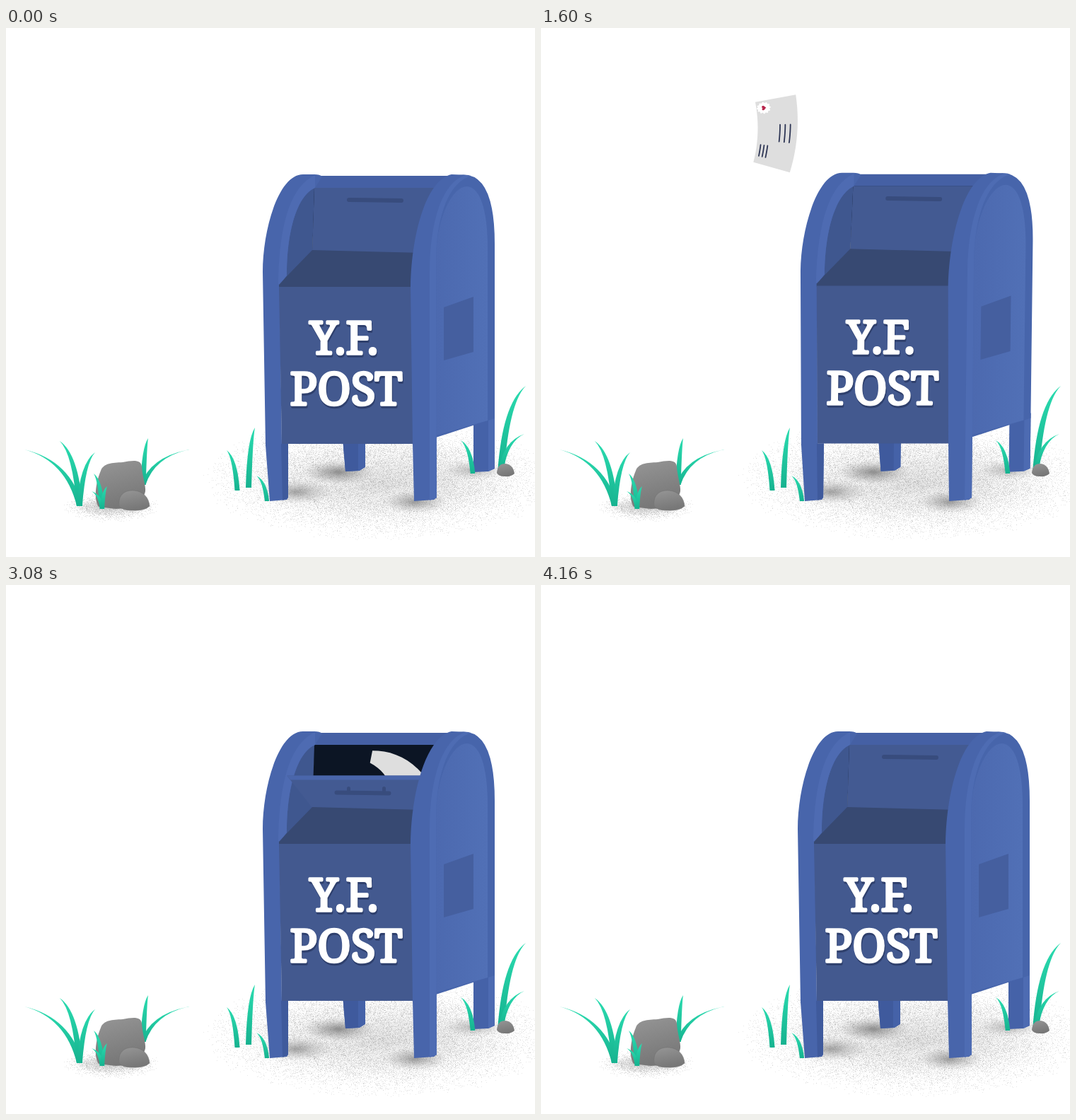
Animation, 748 px wide and 748 px high, one loop 9.64 s. Source, as an HTML page with a canvas:

```html
<!DOCTYPE html>
<html lang="en">
<head>
<meta charset="utf-8">
<title>Letter and mailbox</title>
<style>
html, body { margin: 0; width: 100%; height: 100%; overflow: hidden; background: #fff; }
canvas, svg { position: absolute; left: 0; top: 0; width: 748px; height: 748px; }
.sign { font: 64px "Noto Serif", serif; text-anchor: middle; stroke-width: 3.5; stroke-linejoin: round; }
.ink { fill: none; stroke: #2b3352; stroke-linecap: round; }
</style>
</head>
<body>
<canvas id="ground" width="748" height="748"></canvas>
<svg viewBox="0 0 748 748">
  <defs>
    <linearGradient id="blade" x1="0" y1="0" x2="0" y2="1">
      <stop offset="0" stop-color="#2bdcb0"/><stop offset="1" stop-color="#16b28f"/>
    </linearGradient>
    <linearGradient id="stone" x1="0" y1="0" x2="0.3" y2="1">
      <stop offset="0" stop-color="#969696"/><stop offset="1" stop-color="#777"/>
    </linearGradient>
    <linearGradient id="side" x1="0" y1="0" x2="1" y2="0">
      <stop offset="0" stop-color="#4c69af"/><stop offset="1" stop-color="#5170b6"/>
    </linearGradient>
    <radialGradient id="shade">
      <stop offset="0" stop-color="#777" stop-opacity=".8"/>
      <stop offset=".5" stop-color="#888" stop-opacity=".4"/>
      <stop offset="1" stop-color="#aaa" stop-opacity="0"/>
    </radialGradient>
  </defs>

  <g fill="url(#shade)">
    <ellipse cx="530" cy="642" rx="215" ry="58" opacity=".24"/>
    <ellipse cx="470" cy="628" rx="52" ry="17"/>
    <ellipse cx="410" cy="656" rx="52" ry="17" opacity=".8"/>
    <ellipse cx="578" cy="670" rx="46" ry="16" opacity=".85"/>
    <ellipse cx="662" cy="625" rx="46" ry="14" opacity=".6"/>
    <ellipse cx="150" cy="677" rx="60" ry="13" opacity=".5"/>
  </g>
  <g id="backGrass" fill="url(#blade)"></g>

  <g id="box">
    <path d="M476 580H508V621L500 626L480 627Z" fill="#4562a8"/>
    <path d="M476 580H498V626L480 627Z" fill="#3f5a9d"/>
    <path d="M661 555L691 545V623L682 627L661 628Z" fill="#4562a8"/>
    <path d="M682 550L691 545V623L682 627Z" fill="#4d6bb2"/>
    <path d="M436 209H632L605 227H434Z" fill="#4560a4"/>
    <path d="M437 225C412 236 396 280 396 350L384 367H440L433 316Z" fill="#3f578f"/>
    <path d="M436 226H610V320H433Z" fill="#0c1524"/>
    <path d="M367 590L363 345C363 286 385 207 420 207H436Q444 207 447 210L437 226C415 235 397 278 397 350L387 362L390 588L399 588V664L397 667L373 669Z" fill="#4865ab"/>
    <path d="M437 208C402 224 386 278 385 362L387 363L397 350C397 278 415 235 437 226Z" fill="#4e6bb2"/>
    <path d="M389 588H399V664L391 668Z" fill="#3f5a9c"/>

    <g id="letter">
      <path id="paper" fill="#dedede"/>
      <g id="print">
        <path id="lines" class="ink"/>
        <path id="stamp" fill="#fff"/>
        <path id="heart" fill="#b8264c"/>
      </g>
    </g>

    <path id="door" fill="#435a92"/>
    <path id="lip" fill="#4a66ab"/>
    <g id="handle" fill="none" stroke="#384c7d" stroke-linecap="round">
      <path d="M485 243L559 244" stroke-width="6"/>
      <path id="pegs" d="M502 241V237M552 241V237" stroke-width="5"/>
    </g>
    <path d="M433 314L590 318V367H386V363L398 350Z" fill="#374972"/>
    <path d="M386 366H580V588H390Z" fill="#43598f"/>
    <path d="M604 586V330C606 270 625 214 640 208Q691 200 691 305V552L608 579Z" fill="#4765ab"/>
    <path d="M607 576V330C609 265 632 224 652 224C673 226 681 265 681 312V555Z" fill="url(#side)"/>
    <path d="M619 395L661 380V458L619 470Z" fill="#455f9f"/>
    <path d="M572 366C573 290 595 214 630 207L655 208C625 218 608 270 608 330L609 664L605 667L577 669L575 587Z" fill="#4865ab"/>
    <path d="M650 208C616 218 599 276 599 345V668L609 664L608 330C608 270 625 218 658 209Z" fill="#4e6cb3"/>
    <g class="sign" fill="#2f406d" stroke="#2f406d" transform="translate(1 3)">
      <text x="478" y="461">Y.F.</text><text x="481" y="533">POST</text>
    </g>
    <g class="sign" fill="#fff" stroke="#fff">
      <text x="478" y="461">Y.F.</text><text x="481" y="533">POST</text>
    </g>
  </g>

  <path d="M131 677C123 664 128 640 134 626C138 615 150 615 165 614C180 611 191 610 192 620C193 635 198 648 197 655C195 668 175 680 155 680Z" fill="url(#stone)"/>
  <path d="M160 676C158 660 168 653 181 654C194 655 202 664 203 676Q196 683 178 682Q164 682 160 676Z" fill="url(#stone)" stroke="#737373" stroke-width=".6"/>
  <g id="frontGrass" fill="url(#blade)"></g>
  <path d="M694 629Q695 616 706 616Q717 617 719 630Q714 635 705 634Q696 634 694 629Z" fill="url(#stone)"/>
</svg>

<script>
const LOOP = 9640, STEP = 40;
const $ = id => document.getElementById(id);
const set = (id, name, value) => $(id).setAttribute(name, value);
const clamp = v => Math.min(1, Math.max(0, v));
const span = (t, from, to) => clamp((t - from) / (to - from));
const mix = (a, b, u) => a + (b - a) * u;
const poly = points => 'M' + points.join('L');
const times = (n, fn) => Array.from({ length: n }, (_, i) => fn(i));

// A clump of blades that rise from one base and lean out to their tips
function grow(id, x, y, ...tips) {
  $(id).innerHTML += tips.map(([tx, ty]) => {
    const w = 5 + (y - ty) / 28, cx = mix(x, tx, .2), cy = mix(y, ty, .8);
    return `<path d="M${x - w / 2} ${y}Q${cx - w / 2} ${cy} ${tx} ${ty}Q${cx + w / 2} ${cy} ${x + w / 2} ${y}Z"/>`;
  }).join('');
}
grow('backGrass', 104, 676, [26, 596], [76, 584], [126, 600]);
grow('backGrass', 194, 646, [201, 580], [260, 596]);
grow('frontGrass', 136, 680, [124, 630], [121, 655], [143, 648]);
grow('frontGrass', 327, 654, [312, 597]);
grow('frontGrass', 343, 650, [352, 565]);
grow('frontGrass', 369, 669, [354, 633]);
grow('frontGrass', 700, 625, [735, 506], [733, 574]);
grow('frontGrass', 660, 630, [643, 583]);

// Ground grain that thins out towards its edge
let seed = 7;
const rnd = () => (seed = (seed * 16807) % 2147483647) / 2147483647;
function speckle(cx, cy, rx, ry, count) {
  const g = $('ground').getContext('2d');
  g.fillStyle = 'rgba(150,150,150,.22)';
  for (let i = 0; i < count; i++) {
    const a = rnd() * Math.PI * 2, r = Math.sqrt(rnd()) * mix(.5, 1, rnd());
    g.fillRect(Math.round(cx + Math.cos(a) * r * rx), Math.round(cy + Math.sin(a) * r * ry), 1, 1);
  }
}
speckle(530, 638, 255, 88, 22000);
speckle(149, 677, 70, 22, 2000);

// Eased steps through [time, value] points
function ease(keys, t) {
  let value = keys[0][1];
  for (let i = 1; i < keys.length; i++) {
    const u = span(t, keys[i - 1][0], keys[i][0]);
    value += (keys[i][1] - keys[i - 1][1]) * (1 - Math.cos(Math.PI * u)) / 2;
  }
  return value;
}
const opening = [[1760, 0], [2000, 1], [2800, 1.2], [3360, 1.15], [3720, 0]];
const sway = [[0, 0], [240, 7.5], [360, -2], [440, 0]];

// Point and heading on a cubic curve
function curve(p, u) {
  const w = 1 - u;
  const pos = k => w ** 3 * p[0][k] + 3 * w * w * u * p[1][k] + 3 * w * u * u * p[2][k] + u ** 3 * p[3][k];
  const vel = k => w * w * (p[1][k] - p[0][k]) + 2 * w * u * (p[2][k] - p[1][k]) + u * u * (p[3][k] - p[2][k]);
  return { x: pos(0), y: pos(1), rot: Math.atan2(vel(1), vel(0)) };
}
const swoop = [[-14, 200], [110, 270], [320, 330], [328, 151]];
const dive = [[328, 151], [124, 191], [430, 90], [554, 257]];
const TURN = 1600, LAND = 2640;

// The letter flies up along the swoop, flips over, then drops into the box
function pose(t) {
  if (t <= TURN) {
    const u = span(t, 720, TURN) ** 1.6, len = mix(26, 98, u);
    return { ...curve(swoop, u), len, wide: len * .57, bend: -.45 * u, taper: .08 * u };
  }
  const u = span(t, TURN, LAND), { x, y } = curve(dive, u);
  return {
    x, y: y + 105 * span(t, LAND, 3360) ** 6,
    rot: mix(-87, 44, u ** 2.4) * Math.PI / 180,
    len: 98 + 36 * u - 48 * u * u,
    wide: 56 * Math.cos(Math.PI * span(t, TURN, 2040)) * (1 - .3 * u * u),
    bend: mix(-.45, 1.15, 1 - (1 - u) ** 3),
    taper: mix(.08, 1.1, u * u)
  };
}

function drawLetter(t) {
  const shown = t >= 720 && t < 3400;
  $('letter').style.display = shown ? '' : 'none';
  if (!shown) return;
  const { x, y, rot, len, wide, bend, taper } = pose(t);
  const k = Math.abs(bend) < .001 ? .001 : bend, r = len / k;
  const cos = Math.cos(rot), sin = Math.sin(rot);

  // Paper coordinates, wrapped on an arc
  const at = (u, v) => {
    const a = k * u, off = r - v * wide * (1 + taper * u);
    const px = Math.sin(a) * off, py = r - Math.cos(a) * off;
    return `${(x + px * cos - py * sin).toFixed(2)} ${(y + px * sin + py * cos).toFixed(2)}`;
  };
  const run = (u0, u1, v) => times(13, i => at(mix(u0, u1, i / 12), v));
  set('paper', 'd', poly([...run(-.5, .5, -.5), ...run(.5, -.5, .5)]) + 'Z');

  // Only the front is printed
  $('print').style.display = wide > 2 ? '' : 'none';
  if (wide <= 2) return;
  const rows = times(3, i => poly(run(-.12, .12, .06 + .13 * i)) + poly(run(-.38, -.2, -.4 + .09 * i)));
  set('lines', 'd', rows.join(''));
  set('lines', 'stroke-width', len * .018);
  const ring = times(72, i => {
    const a = i * Math.PI / 36, q = 1 + .1 * Math.cos(12 * a);
    return at(.385 + Math.cos(a) * q * .085, -.32 + Math.sin(a) * q * .16);
  });
  set('stamp', 'd', poly(ring) + 'Z');
  const love = times(24, i => {
    const a = i * Math.PI / 12;
    const h = 13 * Math.cos(a) - 5 * Math.cos(2 * a) - 2 * Math.cos(3 * a) - Math.cos(4 * a);
    return at(.385 + Math.sin(a) ** 3 * .036, -.32 - h * .0038);
  });
  set('heart', 'd', poly(love) + 'Z');
}

function drawBox(t) {
  // Lean and stretch from the feet
  const k = (ease(sway, t - 1440) + ease(sway, t - 3720)) / 462, sy = 1 + k * .4;
  set('box', 'transform', `matrix(1 0 ${-k} ${sy} ${k * 669} ${669 * (1 - sy)})`);

  const o = ease(opening, t), part = clamp(o), extra = o - part;
  const top = 226 + 37 * o, left = 436 - 36 * part - 16 * extra;
  set('door', 'd', `M${left} ${top}H606L590 320L433 315Z`);
  set('lip', 'd', `M${left} ${top}H606V${top + 6 * part}H${left + 5 * part}Z`);
  set('handle', 'transform', `translate(${-17.5 * part} ${47 * part + 20 * extra})`);
  set('pegs', 'opacity', part);
}

function frame() {
  const t = Math.floor(performance.now() % LOOP / STEP) * STEP;
  drawLetter(t);
  drawBox(t);
  requestAnimationFrame(frame);
}
frame();
</script>
</body>
</html>
```
